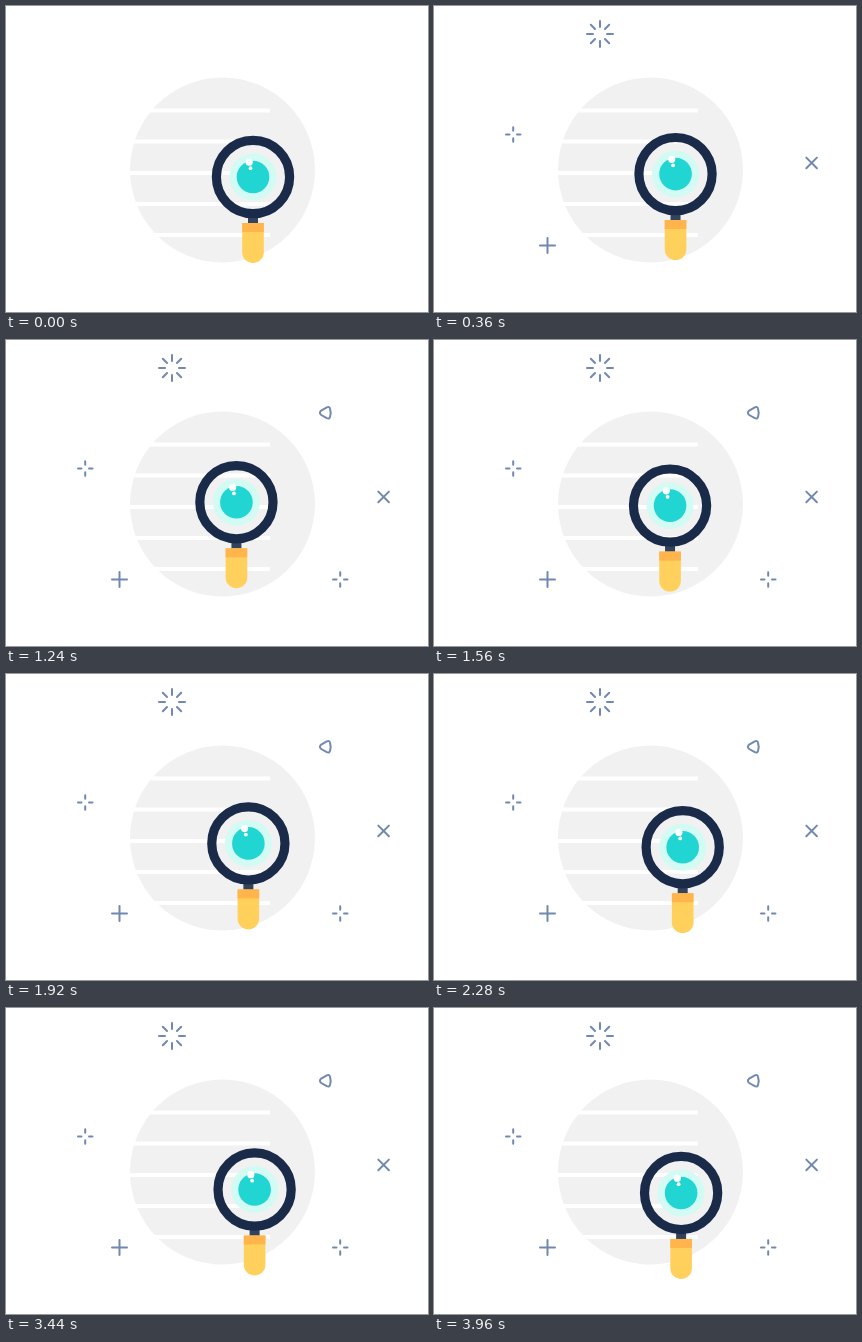
Recreate the animation shown at these times as an HTML page. Size 422 by 306 pixels, loop 4000 ms.

```html
<!DOCTYPE html>
<html lang="en">
<head>
<meta charset="utf-8">
<title>Search</title>
<style>
html, body { margin: 0; width: 100%; height: 100%; overflow: hidden; background: #fff; }
svg { display: block; width: 100vw; height: 100vh; }
.spark { fill: none; stroke: #7189b0; stroke-width: 2; stroke-linecap: round; stroke-linejoin: round; }
</style>
</head>
<body>
<svg viewBox="0 0 422 306">
  <circle cx="216.5" cy="164" r="92.5" fill="#f1f1f1"/>
  <path d="M120 104.5H264M120 135.5H264M120 167H264M120 198H264M120 229H264" stroke="#fff" stroke-width="4"/>

  <g id="sparks" class="spark">
    <path id="burst" transform="translate(166 28)"/>
    <path d="M72 128.5h3.5M83 128.5h3.5M79.2 121.3v3.5M79.2 132.2v3.5"/>
    <path d="M106 239.5h15M113.5 232v15"/>
    <path d="M372.3 151.6l10.6 10.6M382.9 151.6l-10.6 10.6"/>
    <path d="M327 239.5h3.5M338 239.5h3.5M334.2 232.3v3.5M334.2 243.2v3.5"/>
    <path d="M315.2 70.6L320.8 67.4Q323.4 66.3 324 68.6Q325.4 72.8 324 77Q323.4 79.3 320.8 78.2L315.2 75Q312.6 72.8 315.2 70.6Z"/>
  </g>

  <g id="glass">
    <rect x="-5" y="39" width="10" height="8" fill="#34435d"/>
    <path d="M-10.8 46H10.8V75.2A10.8 10.8 0 0 1-10.8 75.2Z" fill="#ffd05c"/>
    <path d="M-10.8 46H10.8V55H-10.8Z" fill="#ffb44c"/>
    <circle r="36.6" fill="none" stroke="#1a2b4a" stroke-width="9.2"/>
    <circle r="23.5" fill="#d2fbf4"/>
    <circle r="16.3" fill="#21d5d2"/>
    <circle cx="-3.8" cy="-14.8" r="3.6" fill="#fff"/>
    <circle cx="-2.5" cy="-8.8" r="1.9" fill="#fff"/>
  </g>
</svg>
<script>
const LOOP = 4000, STEP = 40;
// time, x, y of the lens centre
const route = [
  [0, 247, 171],
  [1170, 229.2, 161.5],
  [2440, 251.5, 174.9],
  [4000, 247, 185.2]
];
const glass = document.getElementById('glass');
const sparks = [...document.getElementById('sparks').children];

const ray = i => {
  const a = i * Math.PI / 4;
  const at = r => `${(r * Math.cos(a)).toFixed(2)} ${(r * Math.sin(a)).toFixed(2)}`;
  return `M${at(7)}L${at(13)}`;
};
document.getElementById('burst').setAttribute('d', Array.from({ length: 8 }, (_, i) => ray(i)).join(''));

function position(t) {
  const i = route.findIndex(p => p[0] > t);
  const [t0, x0, y0] = route[i - 1], [t1, x1, y1] = route[i];
  const k = (t - t0) / (t1 - t0);
  return [x0 + (x1 - x0) * k, y0 + (y1 - y0) * k];
}

function draw(now) {
  const t = Math.floor((now % LOOP) / STEP) * STEP;
  glass.setAttribute('transform', `translate(${position(t).join(' ')})`);
  sparks.forEach((s, i) => s.setAttribute('visibility', t >= 80 * (i + 1) ? 'visible' : 'hidden'));
}

const start = performance.now();
function tick() {
  draw(performance.now() - start);
  requestAnimationFrame(tick);
}
tick();
</script>
</body>
</html>
```
